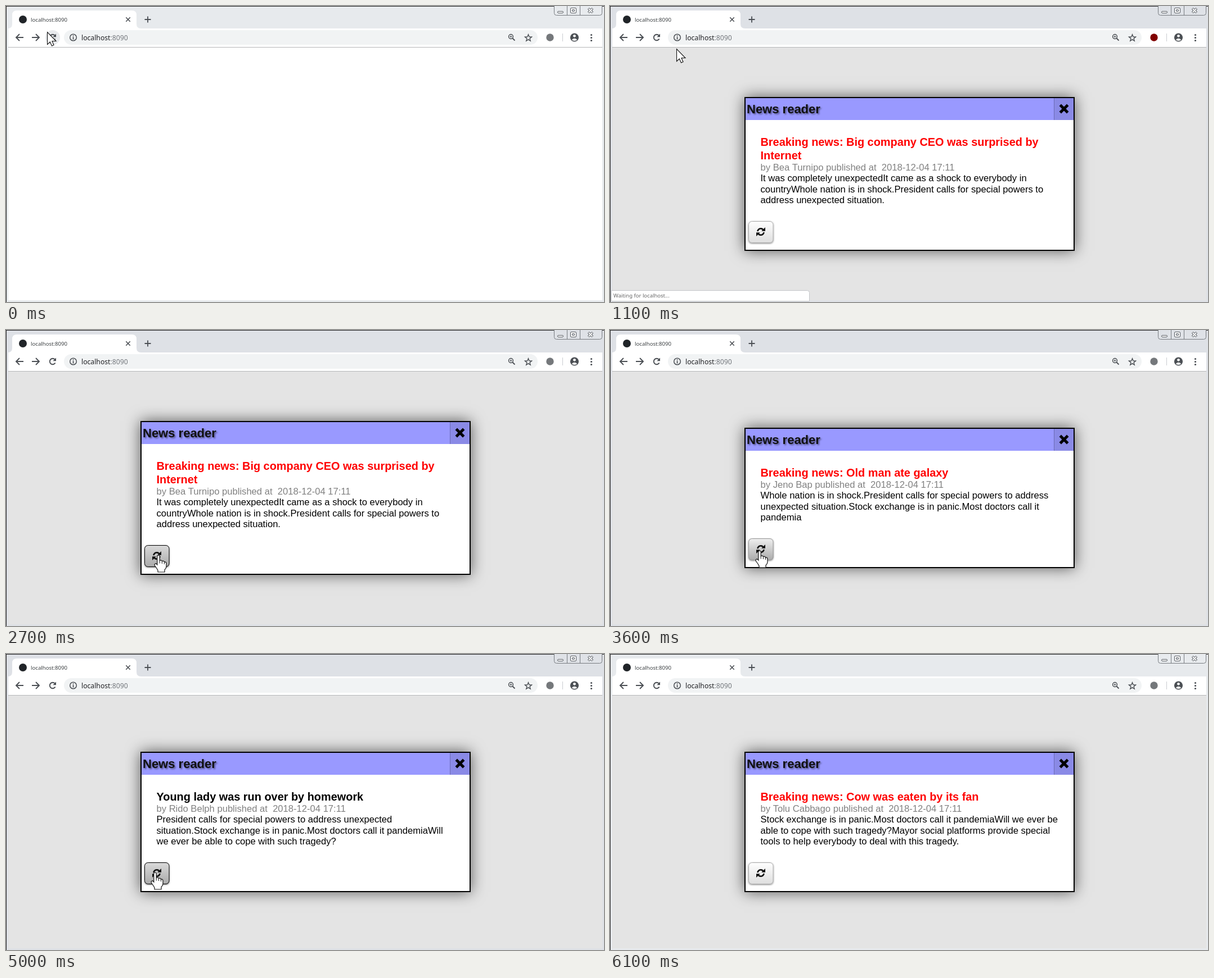
An HTML page with a canvas for the animation above (6300 ms loop, 1063x527 px).

```html
<!DOCTYPE html>
<html lang="en">
<head>
<meta charset="utf-8">
<title>News reader</title>
<style>
html, body { margin: 0; width: 100%; height: 100%; overflow: hidden; background: #fff; }
canvas { display: block; }
</style>
</head>
<body>
<canvas id="stage" width="1063" height="527"></canvas>
<script>
const ctx = document.getElementById('stage').getContext('2d');
const LOOP = 6300, TICK = 100;
const UI = '"Noto Sans", sans-serif', PAGE = '"Liberation Sans", Arial, sans-serif';
const ICON = '#4b4f54';

const stories = [
  { from: 1100, top: 162, color: '#f00', author: 'Bea Turnipo',
    head: ['Breaking news: Big company CEO was surprised by', 'Internet'],
    body: ['It was completely unexpectedIt came as a shock to everybody in',
      'countryWhole nation is in shock.President calls for special powers to',
      'address unexpected situation.'] },
  { from: 2900, top: 174, color: '#f00', author: 'Jeno Bap',
    head: ['Breaking news: Old man ate galaxy'],
    body: ['Whole nation is in shock.President calls for special powers to address',
      'unexpected situation.Stock exchange is in panic.Most doctors call it', 'pandemia'] },
  { from: 4300, top: 174, color: '#000', author: 'Rido Belph',
    head: ['Young lady was run over by homework'],
    body: ['President calls for special powers to address unexpected',
      'situation.Stock exchange is in panic.Most doctors call it pandemiaWill',
      'we ever be able to cope with such tragedy?'] },
  { from: 5200, top: 174, color: '#f00', author: 'Tolu Cabbago',
    head: ['Breaking news: Cow was eaten by its fan'],
    body: ['Stock exchange is in panic.Most doctors call it pandemiaWill we ever be',
      'able to cope with such tragedy?Mayor social platforms provide special',
      'tools to help everybody to deal with this tragedy.'] }
];

// time, x, y of the pointer tip
const route = [[0, 73, 46], [600, 73, 46], [1000, 110, 68], [1100, 118, 76], [1300, 168, 185],
  [1500, 232, 322], [1700, 262, 382], [1900, 271, 401], [3500, 271, 401], [3600, 266, 393],
  [3700, 265, 389], [5200, 265, 389], [5800, 87, 509], [5900, 87, 540], [LOOP, 87, 540]];

const within = (t, a, b) => t >= a && t < b;

function pointerAt(t) {
  const i = route.findIndex(p => p[0] > t);
  const [t0, x0, y0] = route[i - 1], [t1, x1, y1] = route[i];
  const k = (t - t0) / (t1 - t0);
  return [Math.round(x0 + (x1 - x0) * k), Math.round(y0 + (y1 - y0) * k)];
}

function rect(x, y, w, h, color) {
  ctx.fillStyle = color;
  ctx.fillRect(x, y, w, h);
}

function round(x, y, w, h, r, fill, line) {
  ctx.beginPath();
  ctx.roundRect(x, y, w, h, r);
  if (fill) { ctx.fillStyle = fill; ctx.fill(); }
  if (line) { ctx.strokeStyle = line; ctx.lineWidth = 1; ctx.stroke(); }
}

function disc(x, y, r, color) {
  ctx.beginPath();
  ctx.arc(x, y, r, 0, 7);
  ctx.fillStyle = color;
  ctx.fill();
}

function ring(x, y, r, width, color, from = 0, to = Math.PI * 2) {
  ctx.beginPath();
  ctx.arc(x, y, r, from, to);
  ctx.lineWidth = width;
  ctx.strokeStyle = color;
  ctx.stroke();
}

function path(d, x, y, { fill, line, width = 1 }) {
  const p = new Path2D(d);
  ctx.save();
  ctx.translate(x, y);
  if (fill) { ctx.fillStyle = fill; ctx.fill(p); }
  if (line) { ctx.strokeStyle = line; ctx.lineWidth = width; ctx.stroke(p); }
  ctx.restore();
}

function text(s, x, y, font, color) {
  ctx.font = font;
  ctx.fillStyle = color;
  ctx.fillText(s, x, y);
}

const cross = (x, y, r, width, color) =>
  path(`M${-r},${-r}L${r},${r}M${r},${-r}L${-r},${r}`, x, y, { line: color, width });

function drawWindowButtons(active) {
  round(974.5, -4.5, 85, 21, 4, active ? '#dfe2e7' : '#e8ebee', '#777b80');
  path('M997.5,0V16M1020.5,0V16', 0, 0, { line: '#777b80' });
  const line = '#555a60';
  round(980.5, 9.5, 10, 3, 1.5, '#fff', line);
  round(1003.5, 3.5, 10, 9, 1.5, '#fff', line);
  round(1006.5, 6.5, 4, 3, 0.5, '#dfe2e7', line);
  cross(1039, 8, 3.7, 4, line);
  cross(1039, 8, 3.2, 2, '#fff');
}

function drawTab(t, loading) {
  path('M3,40Q11,40 11,32V16Q11,8 19,8H224Q232,8 232,16V32Q232,40 240,40Z', 0, 0, { fill: '#fff' });
  if (loading) {
    const start = 0.2 + (t - 1000) / 1000 * Math.PI * 2;
    ring(29.5, 24, 5.7, 2, '#3b73d9', start, start + 4.6);
  } else {
    disc(30, 24, 7, '#202428');
  }
  text('localhost:8090', 44, 27.5, '9.6px ' + UI, '#3c4043');
  cross(217, 24, 3.7, 1.6, ICON);
  path('M-5.5,0H5.5M0,-5.5V5.5', 252, 24, { line: ICON, width: 1.8 });
}

function drawReload() {
  ring(83, 56, 5.2, 1.9, ICON, 0.5, 5.5);
  path('M6,-6.5V-0.8H0.3Z', 83, 56, { fill: ICON });
}

function drawToolbar(t, loading) {
  rect(4, 40, 1056, 33, '#fff');
  rect(4, 73, 1056, 1, '#b5b6b8');
  path('M7,0H-6M0,-6L-6,0L0,6', 24, 56, { line: ICON, width: 1.9 });
  path('M-7,0H6M0,-6L6,0L0,6', 53, 56, { line: ICON, width: 1.9 });
  if (t < 800) disc(83, 56, 13, '#e8eaed');
  if (within(t, 800, 1100)) cross(83, 56, 5, 1.9, ICON);
  else drawReload();

  round(103, 43, 842, 26, 13, '#f1f3f4');
  ring(119.5, 56, 5.8, 1.5, ICON);
  rect(118.7, 55, 1.7, 4.5, ICON);
  rect(118.7, 52.3, 1.7, 1.7, ICON);
  text('localhost', 134, 60.5, '12.2px ' + UI, '#202124');
  text(':8090', 185.6, 60.5, '12.2px ' + UI, '#74787d');

  ring(897.5, 54.5, 3.9, 1.5, ICON);
  path('M3,3L7,7', 897.5, 54.5, { line: ICON, width: 1.8 });
  path('M-2,0H2M0,-2V2', 897.5, 54.5, { line: ICON });
  let star = '';
  for (let i = 0; i < 10; i++) {
    const a = i * Math.PI / 5 - Math.PI / 2, r = i % 2 ? 2.7 : 6.3;
    star += (i ? 'L' : 'M') + Math.cos(a) * r + ',' + Math.sin(a) * r;
  }
  path(star + 'Z', 928.5, 57, { line: ICON, width: 1.4 });
  disc(967, 56, 6.7, within(t, 500, 1300) ? '#800000' : '#75787b');
  rect(989, 49, 1, 14, '#c9ccd0');
  disc(1010.5, 56, 7.6, ICON);
  disc(1010.5, 53.3, 2.4, '#fff');
  path('M-4.7,4.2Q-2.5,1.8 0,1.8T4.7,4.2Q2.8,6 0,6T-4.7,4.2Z', 1010.5, 56, { fill: '#fff' });
  for (const dy of [-5, 0, 5]) disc(1040.5, 56.5 + dy, 1.6, ICON);
}

function drawRefreshIcon(x, y) {
  ring(x, y, 5.7, 2.6, '#111', Math.PI * 1.05, Math.PI * 1.78);
  ring(x, y, 5.7, 2.6, '#111', Math.PI * 0.05, Math.PI * 0.78);
  path('M8,-8V-1.2H1.2Z M-8,8V1.2H-1.2Z', x, y, { fill: '#111' });
}

function drawButton(y, state) {
  const [top, bottom, border] = {
    normal: ['#fff', '#dedede', '#aaa'],
    hover: ['#f0f0f0', '#aaa', '#999'],
    pressed: ['#dadada', '#a9a9a9', '#000']
  }[state];
  const fill = ctx.createLinearGradient(0, y, 0, y + 39);
  fill.addColorStop(0, top);
  fill.addColorStop(1, bottom);
  ctx.save();
  ctx.shadowColor = 'rgba(0,0,0,.45)';
  ctx.shadowBlur = 3;
  ctx.shadowOffsetY = 1;
  round(246, y, 44.5, 39, 6, fill);
  ctx.restore();
  round(246.5, y + 0.5, 43.5, 38, 6, null, border);
  drawRefreshIcon(268, y + 19);
}

function drawDialog(story, state) {
  const { top, head, body } = story;
  const height = 226 + 24 * head.length;
  ctx.save();
  ctx.shadowColor = 'rgba(0,0,0,.62)';
  ctx.shadowBlur = 25;
  rect(239, top, 587, height, '#000');
  ctx.restore();
  rect(241, top + 2, 583, height - 4, '#fff');
  rect(241, top + 2, 583, 39, '#9999ff');
  rect(790, top + 2, 34, 39, '#8a8ae6');
  rect(789, top + 2, 1, 39, '#6b6bb5');

  ctx.save();
  ctx.shadowColor = 'rgba(0,0,0,.45)';
  ctx.shadowBlur = 3;
  ctx.shadowOffsetX = ctx.shadowOffsetY = 2;
  text('News reader', 243, top + 28.5, 'bold 22px ' + PAGE, '#111');
  ctx.restore();
  cross(807, top + 21, 6.7, 5, '#000');

  let y = top + 87;
  for (const line of head) {
    text(line, 267.5, y, 'bold 19.9px ' + PAGE, story.color);
    y += 24;
  }
  y -= 4;
  const font = '16.6px ' + PAGE;
  text(`by ${story.author} published at  2018-12-04 17:11`, 267.5, y, font, '#808080');
  for (const line of body) text(line, 267.5, y += 19.3, font, '#000');
  drawButton(top + height - 53, state);
}

function drawStatus(alpha) {
  ctx.globalAlpha = alpha;
  round(2.5, 506.5, 352, 19, [0, 4, 0, 0], '#fff', '#c4c6c9');
  text('Waiting for localhost...', 6, 519, '9.5px ' + UI, '#666');
  ctx.globalAlpha = 1;
}

function drawPointer(x, y, hand) {
  if (hand) {
    path('M-2.2,2Q-2.2,0 0,0Q2.2,0 2.2,2V9.5Q5,8 6.4,10.5Q9.2,9.3 10.4,12Q14,11.5 14,15V20' +
      'Q14,23 11,26V30H-1V27Q-3,23 -6.6,18.5Q-7.6,15.5 -5,14.7Q-3.7,15 -2.2,17Z',
      x, y, { fill: '#fff', line: '#111', width: 1.2 });
    path('M2.2,10V14.5M6.4,11V15M10.4,12V16', x, y, { line: '#111' });
  } else {
    path('M.5,.5V22.5L5.3,18L8.5,25L12,23.5L9,16.5H16Z', x, y,
      { fill: '#fff', line: '#111', width: 1.1 });
  }
}

function draw(t) {
  const active = within(t, 200, 6100);
  const loading = within(t, 400, 1100);
  const story = stories.filter(s => s.from <= t).pop();
  const [x, y] = pointerAt(t);

  rect(0, 0, 1063, 527, active ? '#dee1e6' : '#e7eaed');
  rect(0, 0, 1063, 1, '#222');
  rect(0, 0, 1, 527, '#222');
  drawWindowButtons(active);
  drawTab(t, loading);
  drawToolbar(t, loading);
  rect(4, 74, 1056, 450, story ? '#e4e4e4' : '#fff');

  let over = false;
  if (story) {
    const buttonTop = story.top + 173 + 24 * story.head.length;
    const pressed = within(t, 2700, 2900) || within(t, 4100, 4300) || within(t, 5000, 5200);
    over = x >= 246 && x <= 290 && y >= buttonTop && y <= buttonTop + 39;
    drawDialog(story, pressed ? 'pressed' : over ? 'hover' : 'normal');
  }
  if (within(t, 400, 1900)) drawStatus(Math.min(1, (1900 - t) / 400));
  drawPointer(x, y, over);
}

function frame() {
  const t = performance.now() % LOOP;
  draw(Math.floor(t / TICK) * TICK);
  requestAnimationFrame(frame);
}
frame();
</script>
</body>
</html>
```
